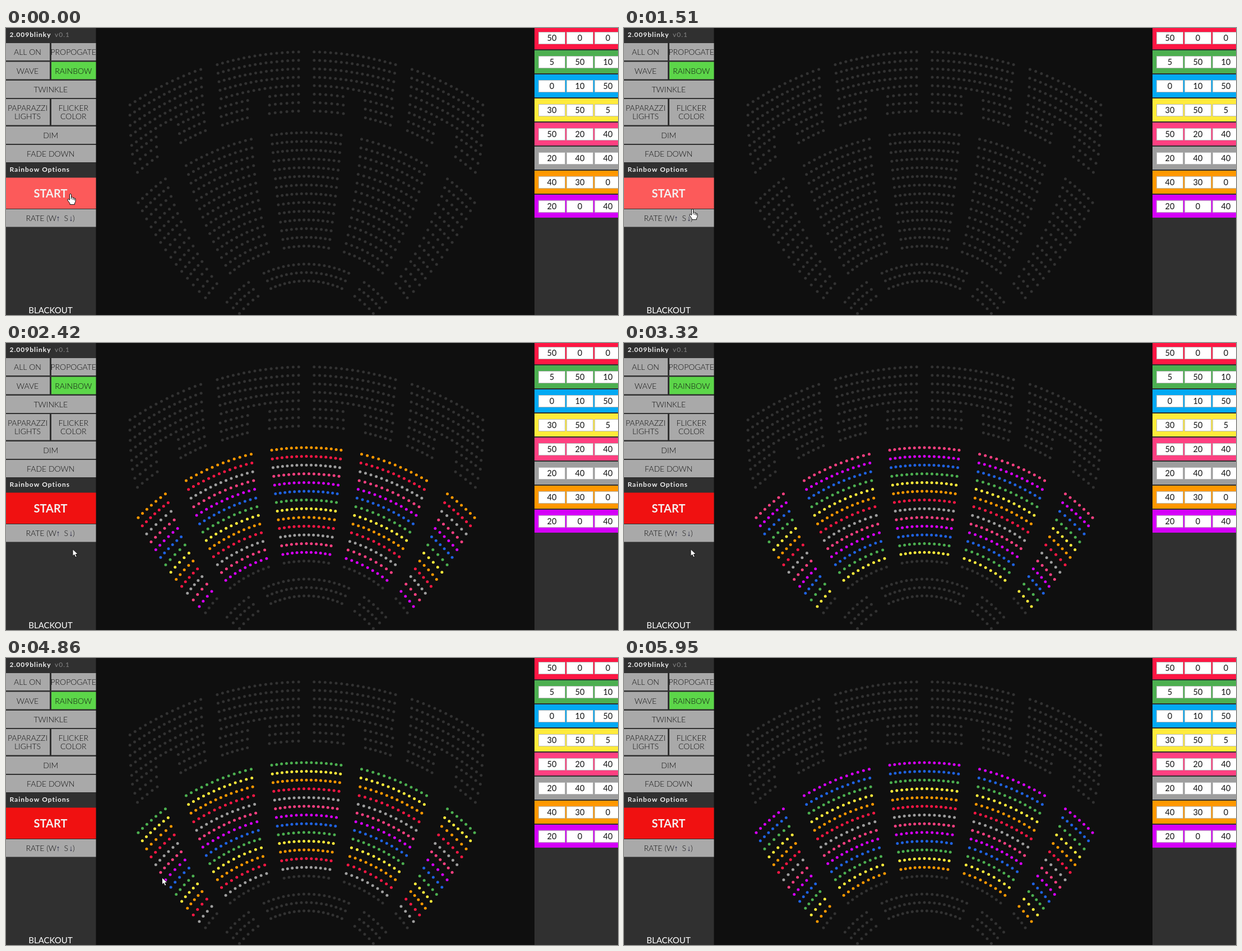
Animation of 1092 by 513 pixels, one loop 6700 ms. Source, as an HTML page with a canvas:

```html
<!DOCTYPE html>
<html lang="en">
<head>
<meta charset="utf-8">
<title>Seat lights</title>
<style>
html, body { margin: 0; width: 100%; height: 100%; overflow: hidden; background: #0f0f0f; }
canvas { display: block; }
</style>
</head>
<body>
<canvas id="stage" width="1092" height="513"></canvas>
<script>
const ctx = document.getElementById('stage').getContext('2d');
const LOOP = 6700;
const FONT = 'Lato, sans-serif', ARROW_FONT = '"Liberation Sans", sans-serif';
const PANEL = '#303030', BUTTON = '#a9a9a9', DIM = '#323232';
const CENTER = { x: 536, y: 606 };

const RED = '#ff1744', GREEN = '#4caf50', YELLOW = '#ffeb3b', PINK = '#ff4081',
      GRAY = '#9e9e9e', ORANGE = '#ff9800', PURPLE = '#d500f9';
const RAINBOW = ['#1f62e0', GREEN, YELLOW, ORANGE, RED, GRAY, PINK, PURPLE];

// Moments when the rainbow lights up and then moves on by three rows.
const STEPS = [1560, 2390, 3320, 4180, 5080, 5950];

// Cursor stops: time, x, y, shape.
const CURSOR = [
  [0, 115, 296.5, 'hand'], [1020, 117, 302, 'hand'], [1080, 120, 309, 'hand'],
  [1140, 122, 315, 'hand'], [1480, 122, 319, 'hand'], [1510, 122, 323.5, 'hand'],
  [1560, 121, 346, 'arrow'], [1620, 119.5, 368, 'arrow'], [1830, 118.5, 368, 'arrow'],
  [4490, 144, 370, 'arrow'], [4550, 196, 373, 'arrow'], [4610, 250, 376, 'arrow'],
  [4760, 262, 382, 'arrow'], [4810, 278, 392, 'arrow'], [4870, 296, 406, 'arrow'],
  [4920, 312, 420, 'arrow'], [4970, 326, 434, 'arrow'], [5030, 336, 448, 'arrow'],
  [5080, 0, 0, 'none']
];

const seats = [];

// Rows of seats on concentric arcs; the angles go from the first row to the last.
function block(radius, step, rows, near, far, gap, mirrored = true, lit = false) {
  for (let row = 0; row < rows; row++) {
    const k = row / (rows - 1);
    const a = near[0] + (near[1] - near[0]) * k;
    const b = far[0] + (far[1] - far[0]) * k;
    const r = radius - step * row;
    const count = Math.round(r * (b - a) * Math.PI / 180 / gap);
    for (let i = 0; i <= count; i++) {
      const angle = (a + (b - a) * i / count) * Math.PI / 180;
      const dx = r * Math.sin(angle), y = CENTER.y - r * Math.cos(angle);
      const rank = lit && row < 13 ? row : -1;
      seats.push({ x: CENTER.x + dx, y, rank });
      if (mirrored) seats.push({ x: CENTER.x - dx, y, rank });
    }
  }
}

// Balcony
block(563.5, 15.1, 5, [1.4, 1.6], [16.4, 17.6], 9.8);
block(488, 15.1, 3, [1.65, 1.75], [7.7, 8.3], 10.4);
block(488, 15.1, 3, [12.4, 13.3], [18.4, 19.1], 10);
block(564.5, 15.1, 5, [19.5, 21.5], [33.9, 38.2], 10.6);
block(490, 15.3, 3, [22, 23.1], [27.8, 29.2], 10.6);
block(491, 15.3, 3, [33.1, 35.3], [39.2, 40.9], 11);
// Main floor
block(419, 15.6, 14, [-8.5, -10.6], [8.5, 10.6], 8.8, false, true);
block(419, 15.6, 14, [13.6, 18.2], [30.8, 39], 10.4, true, true);
block(420, 15.5, 14, [36.8, 47], [45.6, 55.5], 11, true, true);
// Front
block(184, 15, 3, [-24.3, -24.3], [24.3, 24.3], 9, false);
block(183, 15, 3, [34.3, 34.3], [50.7, 51.3], 10.4);

function rect(x, y, w, h, color) {
  ctx.fillStyle = color;
  ctx.fillRect(x, y, w, h);
}

function text(str, x, y, { size = 14, weight = 300, color = '#111', align = 'center', spacing = 0, font = FONT } = {}) {
  ctx.font = `${weight} ${size}px ${font}`;
  ctx.letterSpacing = spacing + 'px';
  ctx.textAlign = align;
  ctx.textBaseline = 'alphabetic';
  ctx.fillStyle = color;
  ctx.fillText(str, x, Math.round(y + size * 0.36));
}

function button(x, y, w, h, lines, color = BUTTON) {
  rect(x, y, w, h, color);
  lines.forEach((line, i) =>
    text(line, x + w / 2 - 0.5, y + h / 2 + 0.5 + (i - (lines.length - 1) / 2) * 15));
}

function drawSidebar(started) {
  const title = { size: 12, weight: 700, color: '#f2f2f2', align: 'left', spacing: 1 };
  rect(0, 0, 160.5, 513, PANEL);
  text('2.009blinky', 6.5, 12, title);
  text('v0.1', 87, 12, { ...title, weight: 400, color: '#858585' });
  button(0, 27, 78, 31, ['ALL ON']);
  button(81, 27, 79.5, 31, ['PROPOGATE']);
  button(0, 60.5, 78, 31, ['WAVE']);
  button(81, 60.5, 79.5, 31, ['RAINBOW'], '#5cd649');
  button(0, 94, 160.5, 31, ['TWINKLE']);
  button(0, 127, 78, 46.5, ['PAPARAZZI', 'LIGHTS']);
  button(81, 127, 79.5, 46.5, ['FLICKER', 'COLOR']);
  button(0, 176, 160.5, 31, ['DIM']);
  button(0, 209, 160.5, 31, ['FADE DOWN']);
  text('Rainbow Options', 6.5, 253, title);
  rect(0, 267.5, 160.5, 55.5, started ? '#f01111' : '#fc5a5a');
  text('START', 79.5, 296, { size: 20, weight: 700, color: '#f4f0f0' });
  rect(0, 324, 160.5, 31.5, BUTTON);
  const left = { align: 'left' };
  const arrow = { ...left, weight: 400, color: '#202040', font: ARROW_FONT };
  text('RATE (W', 35.5, 340, left);
  text('↑', 89.5, 340, arrow);
  text('S', 103.5, 340, left);
  text('↓', 112.5, 340, arrow);
  text(')', 119, 340, left);
  text('BLACKOUT', 79.5, 504.5, { size: 15, weight: 400, color: '#fff' });
}

function drawPalette() {
  const rows = [
    [RED, 50, 0, 0], [GREEN, 5, 50, 10], ['#03a9f4', 0, 10, 50], [YELLOW, 30, 50, 5],
    [PINK, 50, 20, 40], [GRAY, 20, 40, 40], [ORANGE, 40, 30, 0], [PURPLE, 20, 0, 40]
  ];
  rect(943, 0, 149, 513, PANEL);
  rows.forEach(([color, ...values], i) => {
    const y = 43 * i;
    rect(943, y - 3, 149, 41, color);
    values.forEach((value, j) => {
      const x = 950 + 50 * j;
      rect(x, y + 7, 48, 22, '#b8b8b8');
      rect(x + 1, y + 8, 46, 20, '#fff');
      text(value, x + 24, y + 18, { weight: 400, size: 14.5 });
    });
  });
}

function drawSeats(step) {
  for (const { x, y, rank } of seats) {
    const lit = step >= 0 && rank >= 0;
    ctx.fillStyle = lit ? RAINBOW[(rank + 3 * step) % 8] : DIM;
    ctx.beginPath();
    ctx.arc(x, y, 2.5, 0, 7);
    ctx.fill();
  }
}

const SHAPES = {
  arrow: new Path2D('M.5 .5V13L3.4 10.3L5.4 15L7.8 14L5.8 9.6H10Z'),
  hand: new Path2D('M-1.5 11V1.5Q-1.5 0 0 0T1.5 1.5V6Q4 5 4.5 7Q6.5 6 7 8Q9 7.5 9 9.5V13' +
    'Q9 15 7.5 16.5V19H-1V17L-5 11.5Q-5.5 9.5-4 9.2Q-3 9-1.5 11Z')
};

function drawCursor(time) {
  const [, x, y, shape] = CURSOR.findLast(stop => stop[0] <= time);
  if (shape === 'none') return;
  ctx.save();
  ctx.translate(x, y);
  ctx.fillStyle = '#fff';
  ctx.strokeStyle = '#111';
  ctx.lineWidth = 1;
  ctx.lineJoin = 'round';
  ctx.fill(SHAPES[shape]);
  ctx.stroke(SHAPES[shape]);
  if (shape === 'hand') {
    ctx.beginPath();
    for (const [fx, fy] of [[1.5, 6], [4.5, 7], [7, 8]]) {
      ctx.moveTo(fx, fy);
      ctx.lineTo(fx, fy + 3.5);
    }
    ctx.stroke();
  }
  ctx.restore();
}

function draw(now) {
  const time = now % LOOP;
  const step = STEPS.filter(t => t <= time).length - 1;
  rect(0, 0, 1092, 513, '#0f0f0f');
  drawSeats(step);
  drawSidebar(step >= 0);
  drawPalette();
  drawCursor(time);
}

const start = performance.now();
function tick() {
  draw(performance.now() - start);
  requestAnimationFrame(tick);
}
tick();
</script>
</body>
</html>
```
